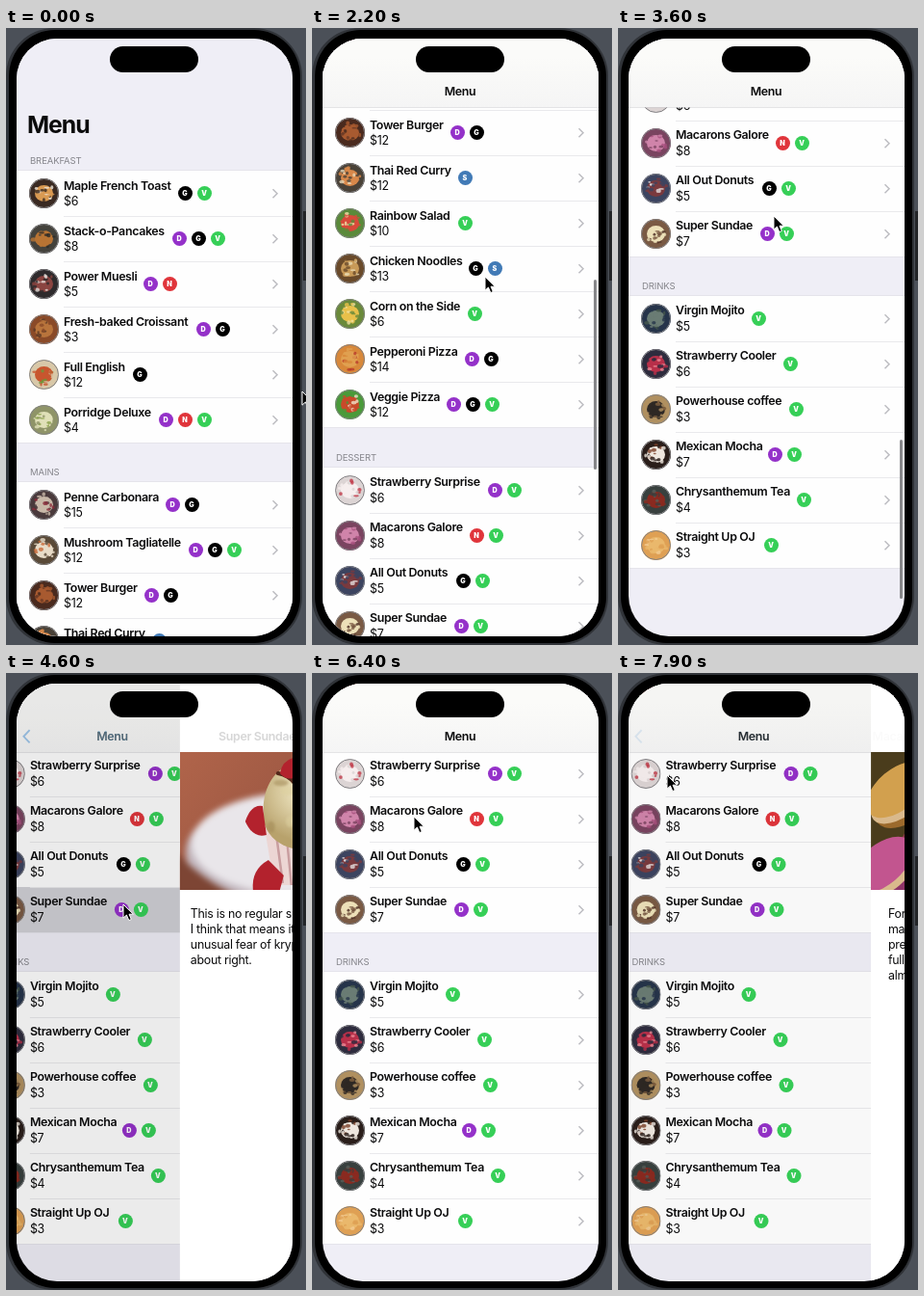
These frames come from a looping animation (312x640 px, 8000 ms). An HTML page:

```html
<!DOCTYPE html>
<html lang="en">
<head>
<meta charset="utf-8">
<title>Menu</title>
<style>
html, body { margin: 0; width: 100%; height: 100%; overflow: hidden; background: #4b5058; }
#stage { position: relative; width: 312px; height: 640px; overflow: hidden;
  font: 12.4px/16px Inter, "Liberation Sans", sans-serif; letter-spacing: -.29px; color: #0b0b0c; }
#stage div, #stage svg { position: absolute; white-space: nowrap; }
.body { left: 0; top: 0; width: 308px; height: 640px; border-radius: 50px; background: #303338; }
.rim { left: 3px; top: 2px; width: 303px; height: 636px; border-radius: 48px; background: #000; }
.key { left: 309px; top: 190px; width: 6px; height: 72px; background: #222427; }
.screen { left: 10.5px; top: 11px; width: 287px; height: 619.5px; border-radius: 42px; overflow: hidden; background: #efeef6; }
.space { left: -10.5px; top: -11px; width: 312px; height: 640px; }
.island { left: 108px; top: 19px; width: 92px; height: 27px; border-radius: 14px; background: #000; }
.group { left: 11px; width: 287px; background: #fefefe; box-shadow: 0 -.5px #dcdbe2, 0 .5px #dcdbe2; }
.row { left: 0; width: 287px; height: 47px; }
.line { left: 49px; right: 0; top: 0; height: 1px; background: #e9e9ec; }
.thumb { left: 13px; top: 8px; width: 31px; height: 31px; border-radius: 50%; overflow: hidden; }
.ring { inset: 0; border-radius: 50%; border: 1.8px solid #808084; box-sizing: border-box; }
.name { left: 49px; top: 7.5px; }
.name, .title { font-weight: 600; letter-spacing: -.34px; }
.price { left: 49px; top: 24px; }
.badge { top: 16px; width: 15px; height: 15px; border-radius: 50%; color: #fff;
  font-size: 7.2px; line-height: 15px; font-weight: 900; letter-spacing: 0; text-align: center; }
.head { left: 25px; font-size: 9.5px; color: #85858b; letter-spacing: -.1px; }
.large { left: 22px; top: 84px; font-size: 24.8px; line-height: 32px; font-weight: 700; letter-spacing: -1px; }
.nav { left: 0; top: 0; width: 312px; height: 82px; background: #efeef6; }
.bar { inset: 0; background: linear-gradient(#fbfbf9 30px, #f5f5f5); box-shadow: 0 .5px #c9c9cc; }
.dim { inset: 0; background: #000; }
.title { left: 54px; width: 200px; top: 58px; text-align: center; }
.back { font-weight: 400; letter-spacing: -.26px; color: #2b78a8; }
.page { left: 11px; top: 0; width: 287px; height: 640px; background: #fff; }
.photo { left: 0; top: 82px; }
.credit { right: 4px; top: 205px; height: 17px; padding: 0 3.5px; background: #080808; color: #f4f4f4;
  font-size: 8.8px; line-height: 17px; letter-spacing: -.05px; }
.text { top: 242px; }
.scroller { left: 293px; width: 2.6px; border-radius: 2px; background: #87878a; }
</style>
</head>
<body>
<div id="stage"></div>
<script>
const LOOP = 8000, STEP = 100, ROW = 47, GAP = 41.3;
const BADGES = { D: "#9431c9", G: "#000", N: "#e0353b", V: "#36cf57", S: "#417ab6" };

// name, price, badges, centre of first badge, photo tones: ground, dish, garnish
const MENU = [
  ["BREAKFAST", [
    ["Maple French Toast", 6, "GV", 186, "#3a2a22 #d99a52 #f0e6d8"],
    ["Stack-o-Pancakes", 8, "DGV", 180, "#44423c #b87434 #2c2a28"],
    ["Power Muesli", 5, "DN", 150, "#2e2a2c #8a4440 #e6deda"],
    ["Fresh-baked Croissant", 3, "DG", 205, "#8a4a28 #b8743c #5a3826"],
    ["Full English", 12, "G", 139, "#d8c8a8 #c8562e #6a9a3a"],
    ["Porridge Deluxe", 4, "DNV", 166, "#8f9468 #e0e0b8 #8aa04a"]]],
  ["MAINS", [
    ["Penne Carbonara", 15, "DG", 173, "#4a3a3c #c8b8a8 #8a2a3a"],
    ["Mushroom Tagliatelle", 12, "DGV", 197, "#5a4a38 #e8dcc8 #c86a3a"],
    ["Tower Burger", 12, "DG", 151, "#4a2a1e #a85a30 #6a3a26"],
    ["Thai Red Curry", 12, "S", 159, "#4a4238 #d8884a #e8d8b8"],
    ["Rainbow Salad", 10, "V", 159, "#5a8a3a #d84a3a #f0e0a8"],
    ["Chicken Noodles", 13, "GS", 170, "#6a4a2a #c89a58 #e8d8b0"],
    ["Corn on the Side", 6, "V", 169, "#6a8a3a #e8c04a #f0e0a0"],
    ["Pepperoni Pizza", 14, "DG", 166, "#d8883a #e0a050 #b83a2a"],
    ["Veggie Pizza", 12, "DGV", 147, "#4a9a3a #c84a2a #f0e0c8"]]],
  ["DESSERT", [
    ["Strawberry Surprise", 6, "DV", 190, "#dcd4d4 #f6eeee #c03a48"],
    ["Macarons Galore", 8, "NV", 171, "#7a4460 #d084aa #a8507e"],
    ["All Out Donuts", 5, "GV", 157, "#3c4460 #7a3a3e #e4dcdc"],
    ["Super Sundae", 7, "DV", 155, "#7a5a44 #ece0b8 #4a2a20"]]],
  ["DRINKS", [
    ["Virgin Mojito", 5, "V", 146, "#26344a #6a7c74 #46584c"],
    ["Strawberry Cooler", 6, "V", 179, "#2e2c3e #b8304a #ee8a96"],
    ["Powerhouse coffee", 3, "V", 185, "#b09060 #2e2824 #806040"],
    ["Mexican Mocha", 7, "DV", 163, "#2a1e1a #efe7df #7a4028"],
    ["Chrysanthemum Tea", 4, "V", 193, "#38403e #8a2a20 #565c58"],
    ["Straight Up OJ", 3, "V", 159, "#dfa054 #eab86c #f2cc94"]]]
];

const CREAM_PATH = "M88 75C82 40 98 14 122 12C145 -2 180 4 194 28C214 48 214 84 202 102C186 116 160 106 142 102C122 104 96 98 88 75Z";

const SUNDAE = () => `
<defs><linearGradient id="wall" x2="1" y2=".4"><stop offset="0" stop-color="#b0644a"/><stop offset="1" stop-color="#8a4c3c"/></linearGradient>
<radialGradient id="cream" cx=".4" cy=".35"><stop offset=".2" stop-color="#efe6c2"/><stop offset="1" stop-color="#b8a26c"/></radialGradient>
<clipPath id="scoop"><path d="${CREAM_PATH}"/></clipPath></defs>
<rect width="287" height="143" fill="url(#wall)"/>
<g style="filter:blur(3px)"><path d="M190 20L300 42V150H190Z" fill="#a9bfca"/><path d="M240 60L300 50V120Z" fill="#7fa6ba"/>
<ellipse cx="122" cy="104" rx="116" ry="60" fill="#c3b8bf"/><ellipse cx="122" cy="95" rx="110" ry="53" fill="#e9e6ea"/>
<path d="M-8 100Q30 140 70 152H-8Z" fill="#7d4534"/></g>
<path d="M120 84L128 143H236Q240 110 212 84Z" fill="#7c1f2b"/>
<path d="M88 78L98 138H136L132 90Z" fill="#ecd6d4"/>
<path d="M100 84L107 136M111 88L116 138M122 90L126 138" stroke="#c99ea0" stroke-width="2.5"/>
<path d="${CREAM_PATH}" fill="url(#cream)"/>
<g clip-path="url(#scoop)" style="filter:blur(1px)">${scatter(31, 40, [148, 55], 62, 9, ["#f4edcf", "#c4b07a", "#dccf9e", "#a28a58"], .55)}</g>
<path d="M102 22C124 26 128 50 122 60C132 58 146 92 140 120M130 14C156 20 150 40 166 50C178 58 172 74 182 68C192 58 170 30 162 8M176 36C192 60 196 90 206 108"
 fill="none" stroke="#54281a" stroke-width="4" stroke-linecap="round"/>
<g fill="#b3222d"><path d="M104 22Q108 2 132 6Q138 14 126 24Q112 32 104 22Z"/><path d="M164 8Q184 4 194 20Q188 32 176 24Z"/>
<path d="M68 72Q74 54 86 56L90 86Q76 90 68 72Z"/><path d="M76 143Q74 122 92 112L108 128 104 143Z"/>
<circle cx="162" cy="124" r="12"/><path d="M186 112Q204 92 224 104L216 130 192 134Z"/><circle cx="126" cy="138" r="9"/></g>
<path d="M126 22L140 16 138 30ZM178 26L196 22 188 36Z" fill="#7f9a45"/>`;

const MACARONS = () => `
<rect width="287" height="143" fill="#4a3c1c"/>
${[[30, 42, "#d2a04e", "#9c6a2c"], [62, 92, "#8a3a44", "#5c2028"], [14, 120, "#c2558f", "#8d3368"],
   [96, 40, "#c76b9c", "#93406f"], [100, 118, "#d884b1", "#a04d7c"], [165, 60, "#a85a92", "#753a68"],
   [165, 125, "#d9a3c0", "#ad6c92"], [242, 40, "#d688b4", "#9c4c7c"], [242, 112, "#b55f94", "#81406c"]]
  .map(([x, y, top, fill]) => `<g transform="rotate(-40 ${x} ${y})"><ellipse cx="${x}" cy="${y + 9}" rx="38" ry="23" fill="${fill}"/>
   <ellipse cx="${x}" cy="${y + 4}" rx="39" ry="20" fill="#d9b98c"/><ellipse cx="${x}" cy="${y - 4}" rx="38" ry="21" fill="${top}"/></g>`).join("")}`;

const PAGES = [
  { name: "Super Sundae", open: 4500, close: 5800, art: SUNDAE, credit: "Renata Dorvo", x: 11,
    text: ["This is no regular sundae – it's a super sundae!", "I think that means it wears glasses and has an",
           "unusual fear of kryptonite? Yeah, that sounds", "about right."] },
  { name: "Macarons Galore", open: 6700, close: 7640, art: MACARONS, credit: "Odila Brenk", x: 18,
    text: ["For a long time we kept our little", "macarons a secret, but now we proudly", "present them all to you: crisp shells,",
           "full of buttercream, and made with fresh", "almonds every day."] }
];

// time, value...
const SCROLL = [[1600, 0], [1700, 12.5], [1800, 75], [1900, 180], [2000, 295], [2200, 480], [2400, 615], [2700, 734],
  [3000, 815], [3300, 866], [3500, 885], [3600, 887], [3700, 878], [3800, 866], [4000, 856], [4100, 855]];
const POINTER = [[0, 308, 377], [300, 300, 374], [900, 215, 352], [1400, 162, 338], [1600, 162, 336], [1700, 162, 323],
  [1900, 170, 245], [2200, 180, 258], [2700, 181, 255], [3200, 170, 232], [3600, 162, 195], [3800, 150, 214],
  [4200, 124, 240], [4600, 122, 240], [5100, 62, 60], [5400, 42, 26], [5650, 41, 62], [5900, 43, 64],
  [6400, 106, 149], [6900, 106, 149], [7300, 48, 64], [7700, 46, 66], [7900, 51, 106], [8000, 58, 122]];
const FADE = [[1600, 0], [1700, 1], [4100, 1], [4400, 0]];
// scroll offset, indicator top, indicator bottom
const THUMB = [[0, 84, 323], [12.5, 88, 325], [60, 105, 302], [734, 356, 553], [855, 395, 592], [887, 427, 592]];

const stage = document.getElementById("stage");
const clamp = v => Math.max(0, Math.min(1, v));

function add(parent, cls, html = "", style = {}) {
  const node = document.createElement("div");
  node.className = cls;
  node.innerHTML = html;
  Object.assign(node.style, style);
  parent.append(node);
  return node;
}

function sample(table, t) {
  let i = 0;
  while (i < table.length - 2 && t > table[i + 1][0]) i++;
  const a = table[i], b = table[i + 1], k = clamp((t - a[0]) / (b[0] - a[0]));
  return a.slice(1).map((v, n) => v + (b[n + 1] - v) * k);
}

function spring(ms) {
  const z = Math.max(0, ms) * .014;
  return 1 - (1 + z) * Math.exp(-z);
}

function random(seed) {
  return () => (seed = seed * 16807 % 2147483647) / 2147483647;
}

// seeded specks spread around a centre
function scatter(seed, count, [cx, cy], spread, size, tones, opacity) {
  const rnd = random(seed * 7919 + 11);
  return Array.from({ length: count }, (_, i) => {
    const a = rnd() * 6.28, d = Math.sqrt(rnd()) * spread;
    return `<ellipse cx="${cx + d * Math.cos(a)}" cy="${cy + d * Math.sin(a)}" rx="${size * (.4 + rnd() * .6)}"
      ry="${size * (.25 + rnd() * .5)}" fill="${tones[i % tones.length]}" opacity="${opacity}"/>`;
  }).join("");
}

function dishArt(tones, seed) {
  const [ground, dish, garnish] = tones.split(" ");
  return `<svg width="31" height="31" style="filter:blur(.6px)"><rect width="31" height="31" fill="${ground}"/>
    <ellipse cx="15.5" cy="15.5" rx="9.5" ry="8.5" fill="${dish}"/>
    ${scatter(seed, 18, [15.5, 15.5], 11, 3, [garnish, dish, ground], .8)}</svg><div class="ring"></div>`;
}

add(stage, "body");
add(stage, "rim");
add(stage, "key");
const screen = add(stage, "screen");
const view = add(screen, "space");
const menu = add(view, "space", "", { left: 0, top: 0 });
const list = add(menu, "space", "", { left: 0, top: 0 });
const rows = {};

add(list, "large", "Menu");
let y = 148, seed = 1;
for (const [label, dishes] of MENU) {
  add(list, "head", label, { top: y - 18 + "px" });
  const group = add(list, "group", "", { top: y + "px", height: dishes.length * ROW + "px" });
  dishes.forEach(([name, price, marks, x, tones], i) => {
    const row = rows[name] = add(group, "row", "", { top: i * ROW + "px" });
    if (i) add(row, "line");
    add(row, "thumb", dishArt(tones, seed++));
    add(row, "name", name);
    add(row, "price", "$" + price);
    [...marks].forEach((m, n) => add(row, "badge", m, { left: x - 18.5 + n * 20 + "px", background: BADGES[m] }));
    row.insertAdjacentHTML("beforeend", `<svg style="left:265px;top:18px" width="8" height="12">
      <path d="M1.5 1.2L6 5.7 1.5 10.2" fill="none" stroke="#bdbdc2" stroke-width="1.5"/></svg>`);
  });
  y += dishes.length * ROW + GAP;
}

const nav = add(menu, "nav");
const bar = add(nav, "bar");
const scroller = add(menu, "scroller");
const dim = add(menu, "dim");

for (const p of PAGES) {
  p.node = add(view, "page", `<svg class="photo" width="287" height="143">${p.art()}</svg>`);
  add(p.node, "credit", "Photo: " + p.credit);
  add(p.node, "text", p.text.join("<br>"), { left: p.x + "px" });
}

const chevron = add(view, "", `<svg width="10" height="16"><path d="M7.6 1.2L1.4 7.8 7.6 14.4" fill="none" stroke="#1c74c6" stroke-width="1.9"/></svg>`,
  { left: "17px", top: "58px" });
const titleDark = add(view, "title", "Menu");
const titleBlue = add(view, "title back", "Menu");
for (const p of PAGES) p.title = add(view, "title", p.name);

add(stage, "island");
const pointer = add(stage, "", `<svg width="16" height="21" style="left:-2px;top:-2px">
  <path d="M2 2V16.2L5.4 13 7.8 18.6 10.3 17.5 8 12.2H12.4Z" fill="#000" stroke="#fff" stroke-width="1"/></svg>`, { left: 0, top: 0 });

const shift = (node, x, dy = 0) => node.style.transform = `translate(${x}px, ${dy}px)`;

function draw(t) {
  const [s] = sample(SCROLL, t);
  shift(list, 0, -s);
  const solid = clamp((s - 32) / 12);
  bar.style.opacity = solid;

  const [top, bottom] = sample(THUMB, s);
  scroller.style.top = top + "px";
  scroller.style.height = bottom - top + "px";
  scroller.style.opacity = sample(FADE, t)[0];

  let shown = 0;
  for (const p of PAGES) {
    let q = spring(t - p.open) - spring(t - p.close);
    if (q < .004) q = 0;
    if (q > .996) q = 1;
    shown += q;
    p.node.style.visibility = q ? "visible" : "hidden";
    shift(p.node, 287 * (1 - q));
    p.title.style.opacity = q * q;
    shift(p.title, 181 * (1 - q));
    const pressed = t < p.close ? clamp((t - p.open + 200) / 100) : clamp(1 - 2 * spring(t - p.close));
    rows[p.name].style.background = `rgba(209, 209, 214, ${pressed})`;
  }
  shift(menu, -86 * shown);
  dim.style.opacity = .18 * shown;
  chevron.style.opacity = shown;
  shift(titleDark, -106.5 * shown);
  shift(titleBlue, -106.5 * shown);
  titleDark.style.opacity = solid * (1 - shown);
  titleBlue.style.opacity = shown;

  shift(pointer, ...sample(POINTER, t));
}

const start = performance.now();
function tick() {
  const t = (performance.now() - start) % LOOP;
  draw(Math.floor(t / STEP) * STEP);
  requestAnimationFrame(tick);
}
tick();
</script>
</body>
</html>
```
